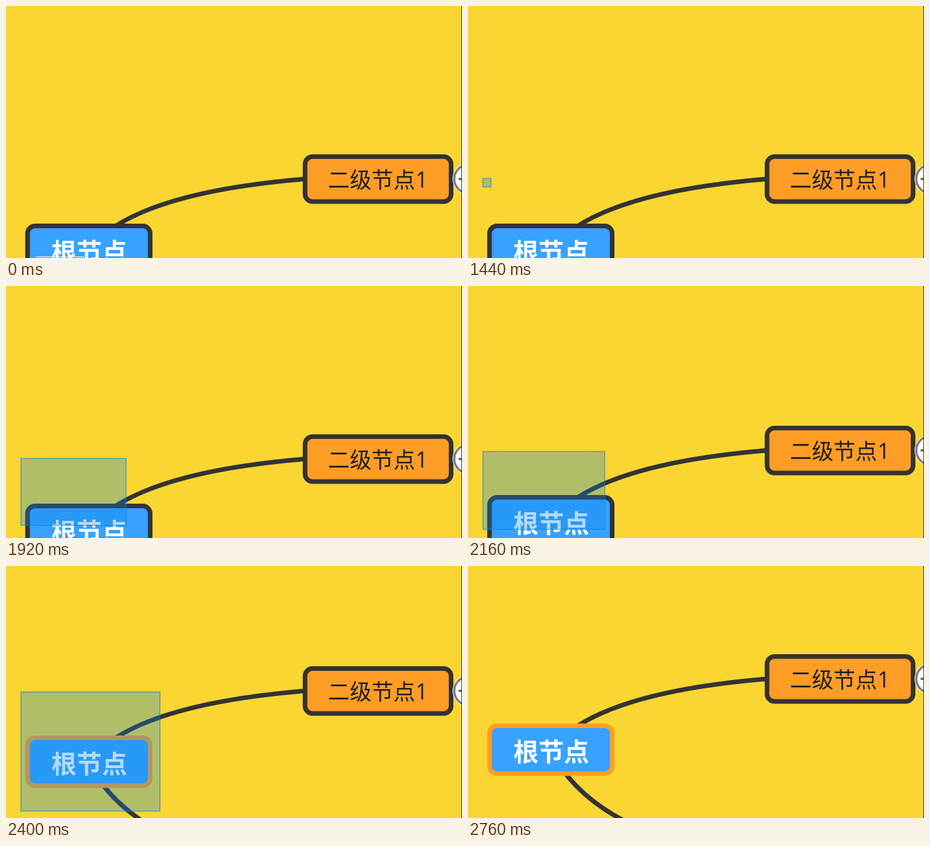
Write an HTML page that moves like this. It is 794 px wide and 440 px high and loops after 3.96 s.

```html
<!DOCTYPE html>
<html lang="zh-CN">
<head>
<meta charset="utf-8">
<title>框选节点</title>
<style>
  html, body { margin: 0; width: 100%; height: 100%; overflow: hidden; background: #fad632; }
  svg { display: block; width: 794px; height: 440px; }
  text { font-family: "Noto Sans CJK SC", "Noto Sans CJK", sans-serif; }
  .digit { font-family: "Open Sans", "Noto Sans", sans-serif; }
  .line { fill: none; stroke: #333; stroke-width: 8; }
  .node { stroke: #333; stroke-width: 8; }
</style>
</head>
<body>
<svg viewBox="0 0 794 440" xmlns="http://www.w3.org/2000/svg">
  <rect width="794" height="440" fill="#fad632"/>
  <g id="map">
    <path id="upper" class="line"/>
    <path id="lower" class="line"/>
    <rect id="root" class="node" x="37.5" y="384" width="213.5" height="83.5" rx="13" fill="#37a2ff"/>
    <text x="145" y="446" font-size="44" font-weight="700" fill="#fff" text-anchor="middle">根节点</text>
    <rect class="node" x="520.7" y="263" width="254.3" height="78.5" rx="13" fill="#ff9d26"/>
    <text x="560.5" y="317.2" font-size="38" fill="#1f1f1f">二级节点<tspan class="digit" x="713">1</tspan></text>
    <circle cx="805.5" cy="302" r="28" fill="#fff"/>
    <circle cx="805.5" cy="302" r="25" fill="#fff" stroke="#808080" stroke-width="4"/>
    <path d="M788 302H823" stroke="#707070" stroke-width="4"/>
  </g>
  <rect id="mark" x="52" y="437" width="84" height="2" fill="#fff" opacity=".65"/>
  <rect id="box" fill="#0984e3" fill-opacity=".3" stroke="#0984e3" stroke-opacity=".5" stroke-width="2"/>
  <rect x="793" width="1" height="440" fill="#222"/>
</svg>
<script>
const LOOP = 3960, STEP = 120;
const DRAG_START = 1440, DRAG_END = 2760, SELECTED_AT = 2400;
const ORIGIN = { x: 26, y: 301 };
const ROOT = { x: 144, y: 426 };

// Pointer position at each step of the drag
const POINTER = [
  [40, 316], [75, 338], [120, 364], [167, 392], [209, 418], [224, 422],
  [238, 425], [253, 427], [268, 428], [271, 429], [272, 429]
];

const $ = id => document.getElementById(id);
const [map, root, mark, box] = ['map', 'root', 'mark', 'box'].map($);

function setAttrs(el, attrs) {
  for (const key in attrs) el.setAttribute(key, attrs[key]);
}

function curveTo(x, y) {
  const cx = ROOT.x + (x - ROOT.x) * 0.2;
  const cy = ROOT.y + (y - ROOT.y) * 0.8;
  return `M${ROOT.x} ${ROOT.y}Q${cx} ${cy} ${x} ${y}`;
}

// Auto-scroll begins once the pointer nears the bottom edge
function scrollAt(t) {
  return Math.min(105, Math.max(0, 15 + (t - 2160) * 0.2875));
}

function render(time) {
  const t = Math.floor(time % LOOP / STEP) * STEP;
  const dragging = t >= DRAG_START && t < DRAG_END;
  const scroll = scrollAt(t);

  map.setAttribute('transform', `translate(0 ${-scroll})`);
  root.style.stroke = t >= SELECTED_AT ? '#ff9d26' : '#333';
  mark.style.display = t < 240 ? '' : 'none';
  box.style.display = dragging ? '' : 'none';

  if (dragging) {
    const [px, py] = POINTER[(t - DRAG_START) / STEP];
    const lag = scroll > 0 && scroll < 105 ? 3 : 0;
    const top = ORIGIN.y - scroll + lag;
    setAttrs(box, { x: ORIGIN.x, y: top, width: px - ORIGIN.x, height: py - top });
  }
}

$('upper').setAttribute('d', curveTo(521, 302));
$('lower').setAttribute('d', curveTo(521, ROOT.y + 194));

const start = performance.now();
function tick() {
  render(performance.now() - start);
  requestAnimationFrame(tick);
}
tick();
</script>
</body>
</html>
```
